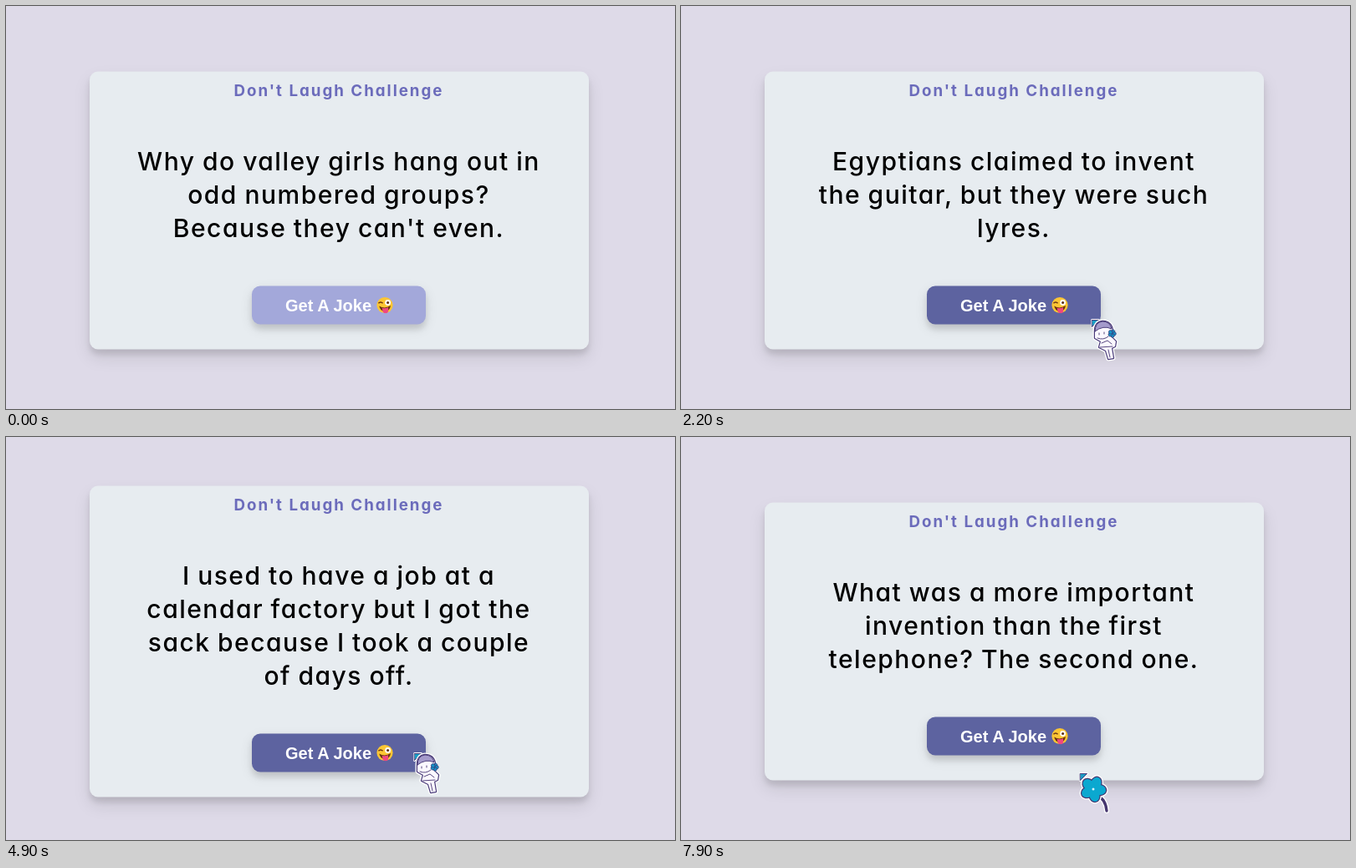
These frames come from a looping animation (800 px wide and 483 px high, 8 s). An HTML page:

```html
<!DOCTYPE html>
<html lang="en">
<head>
<meta charset="utf-8">
<title>Joke card</title>
<style>
html, body { margin: 0; width: 100%; height: 100%; overflow: hidden; background: #dedae8; }
#card {
  position: absolute; left: 99.5px; top: 245.3px; width: 597px; padding: 9px 0 30px;
  box-sizing: border-box; transform: translateY(-50%);
  background: #e7ecf0; border-radius: 10px; text-align: center;
  box-shadow: 0 10px 20px rgba(0,0,0,.1), 0 6px 6px rgba(0,0,0,.1);
  font-family: Inter, "Open Sans", sans-serif;
  font-optical-sizing: none; font-feature-settings: "cv11";
}
h3 { margin: 0; font-size: 18.72px; font-weight: 700; line-height: 28px; letter-spacing: 2px; color: #6b6bbb; }
#joke {
  margin: 50px 0; color: #000; white-space: pre;
  font-size: 30px; font-weight: 450; line-height: 40px; letter-spacing: 1.5px; word-spacing: -1px;
}
#button {
  position: relative; width: 208px; height: 46px; margin: 0 auto; border-radius: 10px;
  background: #a3a8da; color: #fff; text-align: left; text-indent: 40px;
  font: bold 20px/46px "Liberation Sans", Arial, sans-serif;
  box-shadow: 0 5px 15px rgba(0,0,0,.1), 0 6px 6px rgba(0,0,0,.1);
}
#button.hot { background: #5d63a0; }
#button svg { position: absolute; left: 149px; top: 13px; }
#cursor { position: absolute; left: 0; top: 0; overflow: visible; }
</style>
</head>
<body>
<div id="card">
  <h3>Don't Laugh Challenge</h3>
  <div id="joke"></div>
  <div id="button">Get A Joke
    <svg width="20" height="20" viewBox="-10 -10 20 20">
      <circle r="9.6" fill="#fcc634"/>
      <path d="M-6.8 1Q0 5 7 .5Q6 7.5 0 7.6Q-5.5 7-6.8 1Z" fill="#6b3412"/>
      <path d="M-3.2 3.2Q0 4.4 4 2.8L4.2 7Q3.6 10 .6 9.8Q-2.4 9.4-2.8 6.5Z" fill="#f0487f"/>
      <path d="M-7.6-2.2Q-5-5-2.4-2.2" fill="none" stroke="#6b3412" stroke-width="1.5"/>
      <circle cx="3.6" cy="-3" r="3.4" fill="#fff"/>
      <circle cx="3.6" cy="-3" r="1.5" fill="#5a2c10"/>
    </svg>
  </div>
</div>
<svg id="cursor" width="36" height="52" stroke-linejoin="round" stroke-linecap="round">
  <path d="M.5 .5H8.5L.5 8.5Z" fill="#1b9cc4" stroke="#fff" stroke-width="3"/>
  <path d="M.5 .5H8.5L.5 8.5Z" fill="#1b9cc4" stroke="#45417d"/>
  <g id="girl">
    <g id="figure">
      <path d="M4 14Q4 3 13 2Q23 2 25 12L24 21L29 26L28 32L24 34L26 46L20 47L17 37L9 33L11 26L4 22Z"/>
    </g>
    <path d="M4 14Q4 3 13 2Q22 2 24 11Q14 6 4 14Z" fill="#a49acb" stroke="#4a3c79"/>
    <path d="M9 16v2M15 15v2M7 22Q14 25 20 20M12 28L19 25L24 29M10 33L25 32M20 36L22 45" fill="none" stroke="#57477f"/>
    <g id="bow" fill="#1595c8" stroke="#373d7c" stroke-width=".8"></g>
  </g>
  <g id="flower">
    <path d="M20 26Q31 31 32 45" fill="none" stroke="#fff" stroke-width="6"/>
    <path d="M20 26Q31 31 32 45" fill="none" stroke="#46366f" stroke-width="3.4"/>
    <g id="petals"></g>
    <circle cx="16" cy="19" r="1.5" fill="#d9f4ff"/>
  </g>
</svg>
<script>
const $ = id => document.getElementById(id);

// White halo, dark outline, then fill
function sticker(id, shape, fill, ink) {
  const layer = (color, line, width) => `<g fill="${color}" stroke="${line}" stroke-width="${width}">${shape}</g>`;
  $(id).innerHTML = layer("#fff", "#fff", 5) + layer(ink, ink, 2.4) + layer(fill, "none", 0);
}

// Ring of n petals around (x, y)
const ring = (n, x, y, rx, ry) => Array.from({ length: n }, (_, i) =>
  `<ellipse cy="${-ry}" rx="${rx}" ry="${ry}" transform="translate(${x} ${y}) rotate(${25 + i * 360 / n})"/>`).join("");

sticker("figure", $("figure").innerHTML, "#fbf8ff", "#4a3c79");
sticker("petals", ring(5, 16, 19, 6, 7.6), "#0ba8d0", "#46366f");
$("bow").innerHTML = ring(5, 24.5, 16.5, 2.2, 2.4);

const jokes = [
  [0, "Why do valley girls hang out in\nodd numbered groups?\nBecause they can't even."],
  [1200, "Egyptians claimed to invent\nthe guitar, but they were such\nlyres."],
  [3000, "I used to have a job at a\ncalendar factory but I got the\nsack because I took a couple\nof days off."],
  [5000, "A weasel walks into a bar. The\nbartender says, \"Wow, I've\nnever served a weasel before.\nWhat can I get for you?\" \"Pop,\"\ngoes the weasel."],
  [7700, "What was a more important\ninvention than the first\ntelephone? The second one."]
];

// Cursor rests: time, x, y; it eases from one to the next
const rests = [
  [100, 742, 418], [900, 467, 367], [1400, 467, 367], [2200, 491, 376],
  [3400, 488, 373], [5900, 488, 383], [7400, 477, 403]
];

function tipAt(t) {
  const next = rests.find(r => r[0] > t) || rests.at(-1);
  const last = rests.findLast(r => r[0] <= t) || rests[0];
  const k = next === last ? 0 : (t - last[0]) / (next[0] - last[0]);
  const ease = k * k * (3 - 2 * k);
  return [1, 2].map(i => Math.round(last[i] + (next[i] - last[i]) * ease));
}

const show = (id, on) => $(id).style.display = on ? "" : "none";
let shown;

function draw(now) {
  const t = Math.floor(now % 8000 / 100) * 100;
  const joke = jokes.findLast(j => j[0] <= t);
  if (joke !== shown) $("joke").textContent = (shown = joke)[1];

  const [x, y] = tipAt(t);
  const hot = x < 502;
  // The last card shrinks away from under the pointer
  const pointing = hot && joke !== jokes.at(-1);
  $("button").className = hot ? "hot" : "";
  show("cursor", t >= 100);
  show("girl", pointing);
  show("flower", !pointing);
  $("cursor").style.transform = `translate(${x}px, ${y}px)`;
}

const start = performance.now();
function tick() {
  draw(performance.now() - start);
  requestAnimationFrame(tick);
}
tick();
</script>
</body>
</html>
```
